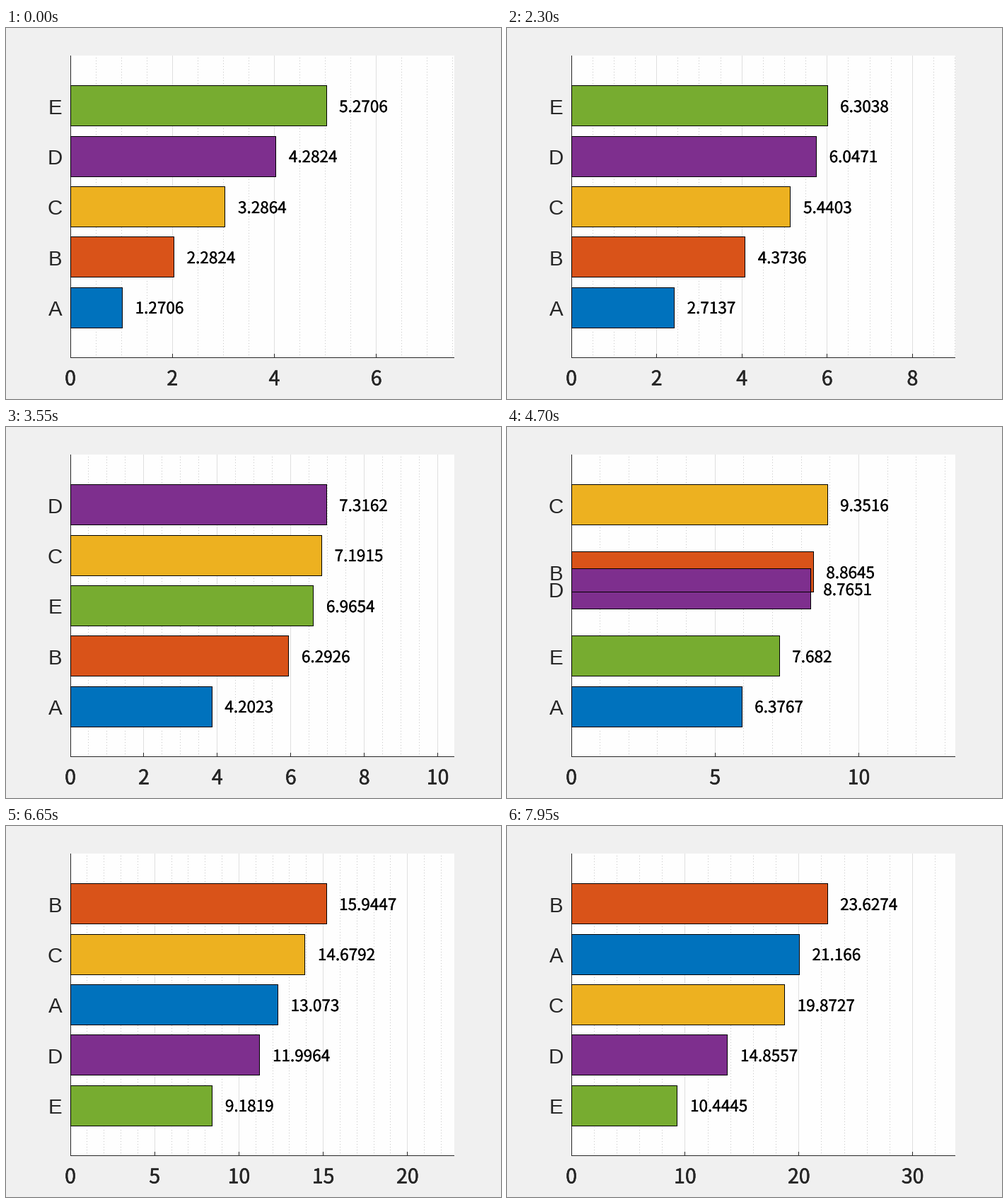
A matplotlib script for the animation above (8 s loop, 700x525 px).

```python
import math

import matplotlib.pyplot as plt
import numpy as np
from matplotlib.animation import FuncAnimation
from matplotlib.collections import LineCollection
from matplotlib.patches import Circle, Polygon, Rectangle
from matplotlib.patheffects import withStroke

W, H, DPI = 700, 525, 100
PX = 72 / DPI
FRAMES, INTERVAL = 160, 50
YEARS, SAMPLES = 45, 230

LEFT, BASE, WIDE, TALL = 91.02, 467, 543, 428
ROW = TALL / 6
EDGE, RIGHT, TOP, BOTTOM = 91, 633, 39, 466

NAMES = "ABCDE"
COLORS = ["#0072BD", "#D95319", "#EDB120", "#7E2F8E", "#77AC30"]
START = np.arange(1, 6)
GROWTH = 1 + np.array([0.10, 0.08, 0.06, 0.04, 0.02])
INK = "#262626"
DIGITS, LETTERS = "Noto Sans CJK JP", "Liberation Sans"

fig = plt.figure(figsize=(W / DPI, H / DPI), dpi=DPI, facecolor="#F0F0F0")
ax = fig.add_axes([0, 0, 1, 1])
ax.set_xlim(0, W)
ax.set_ylim(H, 0)
ax.axis("off")


def table(year):
    return START * GROWTH ** year


def ranks(year):
    return np.argsort(np.argsort(table(year))) + 1


def state(frame):
    """Values and row positions, interpolated between whole years."""
    t = (frame + 1) * YEARS / (SAMPLES - 1)
    y = int(t)
    f = t - y
    return ((1 - f) * table(y) + f * table(y + 1),
            (1 - f) * ranks(y) + f * ranks(y + 1))


def tick_step(limit):
    if limit < 12:
        return 2, 0.5
    if limit < 30:
        return 5, 1
    return 10, 2


def lines(color, z, **kw):
    lc = LineCollection([], colors=color, linewidths=PX, zorder=z,
                        antialiaseds=False, **kw)
    ax.add_collection(lc, autolim=False)
    return lc


def label(size, ha, color, z, family=DIGITS, bold=0.0):
    txt = ax.text(0, 0, "", fontsize=size * PX, ha=ha, va="baseline",
                  color=color, zorder=z, family=family)
    if bold:
        txt.set_path_effects([withStroke(linewidth=bold * PX,
                                         foreground=color)])
    return txt


# Static frame; whole coordinates snap to the pixel that starts there
ax.add_patch(Rectangle((EDGE, TOP), 543, 428, fc="#FEFEFE", lw=0, zorder=0,
                       antialiased=False))
minor = lines("#C6C6C6", 1, linestyles=[(0, (1, 3))])
major = lines("#DFDFDF", 1)
ticks = lines(INK, 2)
lines(INK, 2).set_segments([[(EDGE, TOP), (EDGE, BOTTOM)],
                            [(EDGE, BOTTOM), (RIGHT, BOTTOM)]])

# Bars: all faces first, then all outlines
faces, edges, names, values = [], [], [], []
for i, c in enumerate(COLORS):
    faces.append(ax.add_patch(Rectangle((EDGE, 0), 1, 1, fc=c, lw=0,
                                        zorder=3, antialiased=False)))
    edges.append(ax.add_patch(Rectangle((EDGE, 0), 1, 1, fc="none", ec="black",
                                        lw=PX, zorder=4, antialiased=False)))
    names.append(label(29.5, "right", INK, 5, LETTERS))
    names[i].set_text(NAMES[i])
    values.append(label(22.5, "left", "black", 6, bold=0.3))
numbers = [label(28.5, "center", INK, 5, bold=0.5) for _ in range(8)]

# Toolbar icons that fade in and out above the plot
tools = []


def stroke(xs, ys, width=1.5):
    tools.extend(ax.plot(xs, ys, color="#707070", lw=width * PX, zorder=7,
                         solid_capstyle="round"))


def ring(x, y, r):
    tools.append(ax.add_patch(Circle((x, y), r, fc="none", ec="#707070",
                                     lw=1.5 * PX, zorder=7)))


def solid(points):
    tools.append(ax.add_patch(Polygon(points, fc="#707070", lw=0, zorder=7)))


stroke([463, 463, 477], [29, 33, 33], 2)
stroke([466, 468, 474], [29, 24, 21], 2)
solid([(473, 17), (479, 21), (473, 25)])
solid([(477, 31), (482, 31), (479.5, 34)])
stroke([496, 505], [26, 17], 3)
solid([(487, 34), (491, 27), (495, 25), (498, 28), (495, 33)])
stroke([516, 531, 531, 516, 516, 513, 516, 516],
       [18, 18, 33, 33, 28, 25.5, 23, 18])
for y in (23, 28):
    stroke([519, 528], [y, y])
for x, y in ((542, 20), (545.5, 17), (549, 18), (552.5, 21)):
    stroke([x, x + 0.5], [y, 27], 2)
stroke([538, 543, 550, 553, 553], [26, 33, 34, 31, 25], 2)
for x in (570, 595):
    ring(x, 23.5, 7)
    stroke([x + 5, x + 10], [28.5, 33.5], 2)
    stroke([x - 3, x + 3], [23.5, 23.5])
stroke([570, 570], [20.5, 26.5])
stroke([612, 621.5, 631], [26, 17, 26])
stroke([615, 615, 619.5, 619.5, 623.5, 623.5, 628, 628],
       [25, 34, 34, 28, 28, 34, 34, 25])


def toolbar_alpha(frame):
    return float(np.interp(frame, [10, 13, 16, 18, 20], [0, 0.3, 0.3, 0.15, 0]))


def update(frame):
    vals, rows = state(frame)
    peak = vals.max()
    limit = 1.5 * peak
    scale = WIDE / limit

    step, sub = tick_step(limit)
    marks = np.arange(0, limit, step)
    subs = [v for v in np.arange(0, limit, sub) if v % step]

    def column(v, end=TOP):
        x = math.floor(LEFT + v * scale)
        return [(x, BOTTOM), (x, end)]

    minor.set_segments([column(v) for v in subs])
    major.set_segments([column(v) for v in marks[1:]])
    ticks.set_segments([column(v, BOTTOM - 5) for v in marks])
    for k, num in enumerate(numbers):
        shown = k < len(marks)
        num.set_visible(shown)
        if shown:
            num.set_text(str(int(marks[k])))
            num.set_position((LEFT + marks[k] * scale, 505.5))

    for i in range(5):
        mid = BASE - rows[i] * ROW
        top, low = math.floor(mid - 0.4 * ROW), math.floor(mid + 0.4 * ROW)
        end = math.floor(LEFT + vals[i] * scale)
        for box in (faces[i], edges[i]):
            box.set_bounds(EDGE, top, end - EDGE, low - top)
        names[i].set_position((79.5, round(mid + 11.2)))
        spot = vals[i] + 0.05 * peak
        values[i].set_text(f"{spot:.4f}".rstrip("0").rstrip("."))
        values[i].set_position((LEFT + spot * scale, round(mid + 8.6)))

    alpha = toolbar_alpha(frame)
    for part in tools:
        part.set_alpha(alpha)
        part.set_visible(alpha > 0)
    return []


anim = FuncAnimation(fig, update, frames=FRAMES, interval=INTERVAL,
                     init_func=lambda: update(0), repeat=True, repeat_delay=0,
                     blit=False)
plt.show()
```
